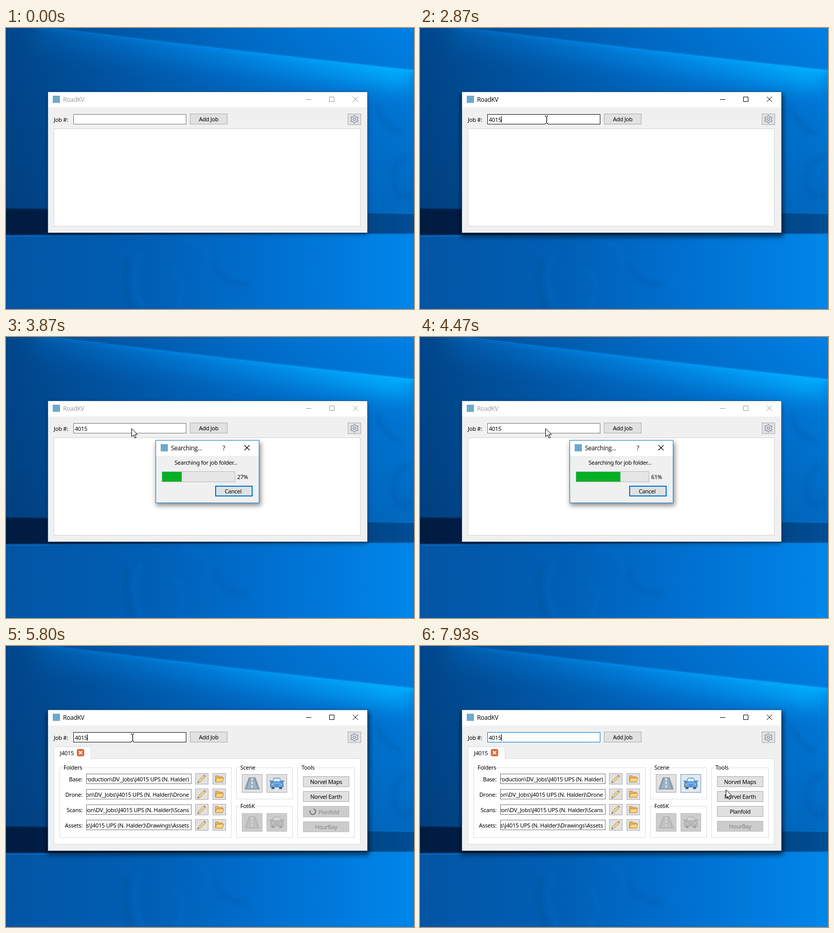
These frames come from a looping animation (794 px wide and 548 px high, 8000 ms). An HTML page:

```html
<!DOCTYPE html>
<html lang="en">
<head>
<meta charset="utf-8">
<title>Job folders</title>
<style>
  html, body { margin: 0; width: 100%; height: 100%; overflow: hidden; background: #0060b8; }
  #stage { display: block; width: 100vw; height: 100vh; }
  text { font: 11px "Noto Sans", "Open Sans", sans-serif; letter-spacing: -.25px; white-space: pre; }
  .title { font: 12px "Open Sans", "Noto Sans", sans-serif; letter-spacing: -.3px; }
  .mid { text-anchor: middle; }
  .end { text-anchor: end; }
  .line { fill: none; stroke: #000; }
  .off { fill: #838383; }
  #main .title { fill: #999; }
  #main .line { stroke: #999; }
  #main.active .title { fill: #000; }
  #main.active .line { stroke: #000; }
  .glow { opacity: 0; }
  .active .glow { opacity: 1; }
  .active .dim { opacity: 0; }
  .grey { filter: grayscale(1); opacity: .38; }
</style>
</head>
<body>
<svg id="stage" viewBox="0 0 794 548" preserveAspectRatio="none">
  <defs>
    <linearGradient id="sky">
      <stop offset="0" stop-color="#01468a"/><stop offset=".3" stop-color="#0059aa"/>
      <stop offset=".6" stop-color="#006cc8"/><stop offset="1" stop-color="#0080e4"/>
    </linearGradient>
    <linearGradient id="floor">
      <stop offset="0" stop-color="#0355a4"/><stop offset=".35" stop-color="#005fb5"/>
      <stop offset=".65" stop-color="#0070d0"/><stop offset="1" stop-color="#0086ea"/>
    </linearGradient>
    <linearGradient id="band">
      <stop offset="0" stop-color="#001c40"/><stop offset=".6" stop-color="#02305f"/>
      <stop offset="1" stop-color="#034f97"/>
    </linearGradient>
    <linearGradient id="ray" gradientUnits="userSpaceOnUse" x1="70" y1="0" x2="794" y2="0">
      <stop offset="0" stop-color="#0a7fe0" stop-opacity=".25"/>
      <stop offset=".5" stop-color="#0a96f5" stop-opacity=".55"/>
      <stop offset="1" stop-color="#06b0ff"/>
    </linearGradient>
    <linearGradient id="shade" x2="0" y2="1">
      <stop offset="0" stop-color="#002d62" stop-opacity="0"/>
      <stop offset="1" stop-color="#002d62" stop-opacity=".28"/>
    </linearGradient>
    <clipPath id="under"><path d="M60-4C250 20 450 45 794 83V360H0V-4Z"/></clipPath>
    <filter id="b1" x="-20%" y="-20%" width="140%" height="140%"><feGaussianBlur stdDeviation="1.2"/></filter>
    <filter id="b5" x="-20%" y="-20%" width="140%" height="140%"><feGaussianBlur stdDeviation="5"/></filter>
    <filter id="b20" x="-20%" y="-90%" width="140%" height="280%"><feGaussianBlur stdDeviation="20"/></filter>

    <g id="gear" fill="none" stroke="#5a6c9c">
      <path d="M0-8L2.6-4.8L6.9-4L5.5 0L6.9 4L2.6 4.8L0 8L-2.6 4.8L-6.9 4L-5.5 0L-6.9-4L-2.6-4.8Z" stroke-linejoin="round"/>
      <circle r="2.5"/>
    </g>
    <g id="pencil">
      <path d="M-7 8L-5.5 3.5L4.5-6.5L7.5-3.5L-2.5 6.5Z" fill="#f5d489" stroke="#8a7a5c" stroke-width=".8"/>
      <path d="M4.5-6.5L6-8L9-5L7.5-3.5Z" fill="#e7a49a" stroke="#8a7a5c" stroke-width=".8"/>
      <path d="M-7 8L-6.2 5.5L-4.6 7.1Z" fill="#444"/>
    </g>
    <g id="folder" stroke="#b9822d" stroke-width=".9" stroke-linejoin="round">
      <path d="M-7.5 6V-6H-2L0-4H6.5V6Z" fill="#e9b455"/>
      <path d="M-7.5 6L-5-1.5H8.5L6.5 6Z" fill="#fbd587"/>
    </g>
    <g id="road">
      <path d="M-6-11H6L14 11H-14Z" fill="#9fb4c3" stroke="#5b7a90"/>
      <path d="M-4.5-10.5L-11 10.5M4.5-10.5L11 10.5" stroke="#6d8799" fill="none"/>
      <path d="M0-10V11" stroke="#fff" stroke-width="2" stroke-dasharray="4 3"/>
    </g>
    <g id="car" stroke="#2c68ac" stroke-linejoin="round">
      <path d="M-10 5H-5V10.500H-10ZM5 5H10V10.500H5Z" fill="#4c5a70"/>
      <path d="M-8-3L-6-9.500Q-5.500-10.500-4-10.500H4Q5.500-10.500 6-9.500L8-3Z" fill="#d5ebfb"/>
      <path d="M-11-3H11Q13 0 12.500 7H-12.500Q-13 0-11-3Z" fill="#6fb4f0"/>
      <path d="M-14-5H-9V-2.500H-12ZM14-5H9V-2.500H12Z" fill="#6fb4f0"/>
      <circle cx="-8.500" cy="1.500" r="2" fill="#ffe9a0"/><circle cx="8.500" cy="1.500" r="2" fill="#ffe9a0"/>
      <path d="M-4.500 2H4.500M-4 4.500H4" fill="none"/>
    </g>
  </defs>

  <g id="wall">
    <path d="M0 0H794V548H0Z" fill="url(#sky)"/>
    <path d="M0 0H794V360H0Z" fill="url(#shade)"/>
    <g clip-path="url(#under)" fill="none" stroke="url(#ray)">
      <path d="M60-4C250 20 450 45 794 83" stroke-width="70" filter="url(#b20)"/>
      <path d="M60-4C250 20 450 45 794 83" stroke-width="10" filter="url(#b5)"/>
    </g>
    <path d="M60-4C250 20 450 45 794 83" fill="none" stroke="url(#ray)" stroke-width="2" filter="url(#b1)"/>
    <path d="M0 400H794V548H0Z" fill="url(#floor)"/>
    <path d="M-9 352L803 362V401L-9 404Z" fill="url(#band)" filter="url(#b1)"/>
    <path d="M-9 406L803 403" stroke="#1080da" stroke-opacity=".6" stroke-width="2.500" filter="url(#b1)"/>
    <g fill="none" filter="url(#b5)" stroke-width="7">
      <path d="M404 455Q415 500 474 501M785 250Q745 265 755 305T790 320M722 150Q730 190 770 205" stroke="#004e9c" stroke-opacity=".35"/>
      <path d="M262 440Q235 490 268 548M345 410Q400 420 395 470M330 548Q360 500 325 470" stroke="#0a74cc" stroke-opacity=".35"/>
      <path d="M235 450Q225 510 245 548" stroke="#004488" stroke-opacity=".35"/>
    </g>
  </g>
  <g id="main"></g>
  <g id="dialog"></g>
  <g id="cursor">
    <path id="arrow" d="M.5.500V16.500L4.200 13L6.800 19L9.300 18L6.700 12.200H11.800Z" fill="#fff" stroke="#000"/>
    <g id="beam" fill="none">
      <path d="M-3-7.500H3M-3 7.500H3M0-7.500V7.500" stroke="#fff" stroke-width="3"/>
      <path d="M-3-7.500H-1M1-7.500H3M-3 7.500H-1M1 7.500H3M.5-7V7" stroke="#000" stroke-width="1.300"/>
    </g>
  </g>
</svg>

<script>
const $ = id => document.getElementById(id);

// Markup helpers
const box = (x, y, w, h, fill, stroke = fill, more = '') =>
  `<rect x="${x + .5}" y="${y + .5}" width="${w - 1}" height="${h - 1}" fill="${fill}" stroke="${stroke}" ${more}/>`;
const text = (x, y, s, cls = '', more = '') => `<text x="${x}" y="${y}" class="${cls}" ${more}>${s}</text>`;
const icon = (name, x, y, cls = '') => `<use href="#${name}" transform="translate(${x} ${y})" class="${cls}"/>`;
const button = (x, y, w, h, label = '', more = '') =>
  box(x, y, w, h, '#e1e1e1', '#adadad', more) + text(x + w / 2, y + 15, label, 'mid');
const disabled = (x, y, w, h, label = '') =>
  box(x, y, w, h, '#ccc', '#bfbfbf') + text(x + w / 2, y + 15, label, 'mid off');
const group = (x, y, w, h, label, gap) =>
  box(x, y, w, h, 'none', '#dcdcdc') + `<rect x="${x + 6}" y="${y}" width="${gap}" height="1" fill="#fff"/>` +
  text(x + 8, y + 4, label);
const shadow = (x, y, w, h, alpha, cls = '') =>
  `<rect x="${x}" y="${y}" width="${w}" height="${h}" fill="#000" opacity="1" fill-opacity="${alpha}" filter="url(#b5)" class="${cls}"/>`;
const appIcon = (x, y) => `<rect x="${x + 1}" y="${y + 1}" width="14" height="14" fill="#6ba9cd"/>`;

const job = 'Production\\DV_Jobs\\J4015 UPS (N. Halder)';
const rows = [['Base', ''], ['Drone', '\\Drone'], ['Scans', '\\Scans'], ['Assets', '\\Drawings\\Assets']];
const folderRow = ([name, tail], i) => {
  const y = 249 + 30 * i;
  return text(149, y + 15, name + ':', 'end') + box(156, y, 205, 20, '#fff', '#7a7a7a') +
    `<svg x="157" y="${y + 1}" width="203" height="18">${text(199, 14, job + tail, 'end')}</svg>` +
    button(368, y - 1, 26, 22) + icon('pencil', 380, y + 10) +
    button(402, y - 1, 26, 22) + icon('folder', 415, y + 10);
};

$('main').innerHTML =
  shadow(83, 128, 620, 274, .45, 'dim') + shadow(80, 128, 627, 279, .6, 'glow') +
  box(81, 124, 623, 276, '#f0f0f0', '#2b5f94') +
  `<rect x="82" y="125" width="621" height="30" fill="#fff"/>` +
  appIcon(90, 131) + text(111, 144, 'RoadKV', 'title') +
  `<path class="line" d="M584 139.500H594M629.500 134.500H638.500V143.500H629.500ZM675 134L685 144M685 134L675 144"/>` +
  text(93, 183, 'Job #:') + box(131, 168, 220, 20, '#fff', '#7a7a7a', 'id="field"') +
  text(134, 183, '', '', 'id="typed"') + `<rect id="caret" y="172" width="1" height="13"/>` +
  button(358, 167, 73, 21, 'Add Job') + button(665, 167, 26, 22) + icon('gear', 678, 178) +
  `<g id="empty">${box(93, 196, 597, 191, '#fff', '#d5d5d5')}</g>` +
  `<g id="tab">` + box(93, 219, 597, 168, '#fff', '#dcdcdc') +
    `<path d="M93.500 220V196.500H165.500V219.500" fill="#fff" stroke="#dcdcdc"/>` +
    `<rect x="94" y="218" width="71" height="3" fill="#fff"/>` + text(105, 213, 'J4015') +
    `<rect x="138.500" y="201.500" width="13" height="13" rx="2" fill="#e2703f" stroke="#b8502a"/>` +
    `<path d="M142 205L148 211M148 205L142 211" stroke="#fff" stroke-width="2"/>` +
    group(104, 237, 335, 137, 'Folders', 38) + rows.map(folderRow).join('') +
    group(448, 237, 110, 62, 'Scene', 33) +
    button(459, 250, 40, 36) + icon('road', 479, 268) +
    button(507, 250, 40, 36, '', 'id="carButton"') + icon('car', 527, 268) +
    group(448, 312, 110, 62, 'Fot6K', 32) +
    disabled(459, 326, 40, 36) + icon('road', 479, 344, 'grey') +
    disabled(507, 326, 40, 36) + icon('car', 527, 344, 'grey') +
    group(567, 237, 112, 137, 'Tools', 30) +
    button(578, 254, 90, 21, 'Norvel Maps') + button(578, 283, 90, 21, 'Norvel Earth') +
    `<g id="busy">` + disabled(578, 312, 90, 22) + text(608, 328, 'Planfold', 'off') +
      `<circle id="spin" cx="597" cy="323" r="5.500" fill="none" stroke="#737373" stroke-width="2" stroke-dasharray="26 9"/>` +
      disabled(578, 342, 90, 21, 'HourBay') + `</g>` +
    `<g id="ready">` + button(578, 312, 90, 21, 'Planfold') + disabled(578, 341, 90, 21, 'HourBay') + `</g>` +
  `</g>`;

$('dialog').innerHTML =
  shadow(292, 206, 204, 123, .45) + box(291, 201, 202, 123, '#f0f0f0', '#1c7fd0') +
  `<rect x="292" y="202" width="200" height="30" fill="#fff"/>` +
  appIcon(300, 208) + text(321, 221, 'Searching...', 'title') + text(424, 221, '?', 'title mid', 'font-weight="bold"') +
  `<path class="line" d="M464 211L474 221M474 211L464 221" stroke-width="1.200"/>` +
  text(328, 249, 'Searching for job folder...') + box(303, 262, 143, 21, '#e6e6e6', '#bcbcbc') +
  `<rect id="bar" x="304" y="263" height="19" fill="#06b025"/>` + text(450, 277, '', '', 'id="percent"') +
  `<rect x="408" y="291" width="71" height="19" fill="#e1e1e1" stroke="#0078d7" stroke-width="2"/>` +
  text(442, 305, 'Cancel', 'mid');

// Interpolates rows of [time, ...values]
const linear = u => u, smooth = u => u * u * (3 - 2 * u);
function track(t, keys, ease = linear) {
  const i = keys.findIndex(k => k[0] > t);
  if (i === 0) return keys[0].slice(1);
  if (i < 0) return keys.at(-1).slice(1);
  const a = keys[i - 1], b = keys[i], u = ease((t - a[0]) / (b[0] - a[0]));
  return a.slice(1).map((v, n) => v + (b[n + 1] - v) * u);
}
const rgb = c => `rgb(${c.map(Math.round)})`;
const show = (id, on) => $(id).style.display = on ? '' : 'none';
const between = (t, a, b) => t >= a && t < b;

const GREY = [122, 122, 122], BLACK = [23, 23, 23], BLUE = [0, 120, 215];
const border = [[1000, ...GREY], [1130, ...BLACK], [3400, ...BLACK], [3730, ...GREY],
  [4600, ...GREY], [4800, ...BLACK], [7400, ...BLACK], [7600, ...BLUE]];
const path = [[190, 778, 540], [1000, 248, 180], [1590, 248, 180], [1599, 246, 179],
  [6930, 246, 179], [7066, 257, 185], [7340, 257, 185], [7930, 595, 280]];
const fade = [[3340, 0, .93], [3530, .76, .985], [3600, 1, 1], [4520, 1, 1], [4700, 0, .93]];
const hover = [[7670, 0], [7730, 1], [7800, 1], [8000, .15]];
const keyTimes = [2260, 2460, 2730, 2860];
const OPEN = 3395, FOUND = 4530, DONE = 6262, BLINK = 533.3;

function caretOn(t) {
  if (between(t, 1325, OPEN)) return !between(t, 1860, 2260);
  return t >= FOUND && Math.floor((t - FOUND + 5) / BLINK) % 2 === 0;
}

function draw(t) {
  $('main').classList.toggle('active', between(t, 1325, OPEN) || t >= FOUND);
  $('field').setAttribute('stroke', rgb(track(t, border)));

  const typed = keyTimes.filter(k => t >= k).length;
  $('typed').textContent = '4015'.slice(0, typed);
  $('caret').setAttribute('x', 134 + 6 * typed);
  show('caret', caretOn(t));

  show('empty', t < 4595);
  show('tab', t >= 4595);
  show('busy', t < DONE);
  show('ready', t >= DONE);
  $('spin').setAttribute('transform', `rotate(${t * .36 % 360} 597 323)`);
  const [h] = track(t, hover);
  $('carButton').setAttribute('fill', rgb([225 + 4 * h, 225 + 16 * h, 225 + 26 * h]));
  $('carButton').setAttribute('stroke', rgb([173 - 173 * h, 173 - 53 * h, 173 + 42 * h]));

  const [alpha, scale] = track(t, fade);
  show('dialog', between(t, OPEN, 4700));
  $('dialog').setAttribute('opacity', alpha);
  $('dialog').setAttribute('transform', `translate(392 262.5) scale(${scale}) translate(-392 -262.5)`);
  const done = Math.max(0, Math.floor(8.2 + (Math.min(t, FOUND) - 3533) * .0567));
  $('bar').setAttribute('width', Math.round(1.41 * done));
  $('percent').textContent = done + '%';

  let [x, y] = track(t, path, smooth).map(Math.round);
  const isBeam = between(y, 168, 188) && x < 351 && !between(t, OPEN, 4595);
  if (!isBeam && between(t, OPEN, 4595)) { x = 244; y = 178; }
  show('cursor', t >= 195);
  show('beam', isBeam);
  show('arrow', !isBeam);
  $('cursor').setAttribute('transform', `translate(${x} ${y})`);
}

const start = performance.now();
function tick() {
  const t = (performance.now() - start) % 8000;
  draw(Math.min(119, Math.floor((t + 4) * .015)) / .015);
  requestAnimationFrame(tick);
}
tick();
</script>
</body>
</html>
```
